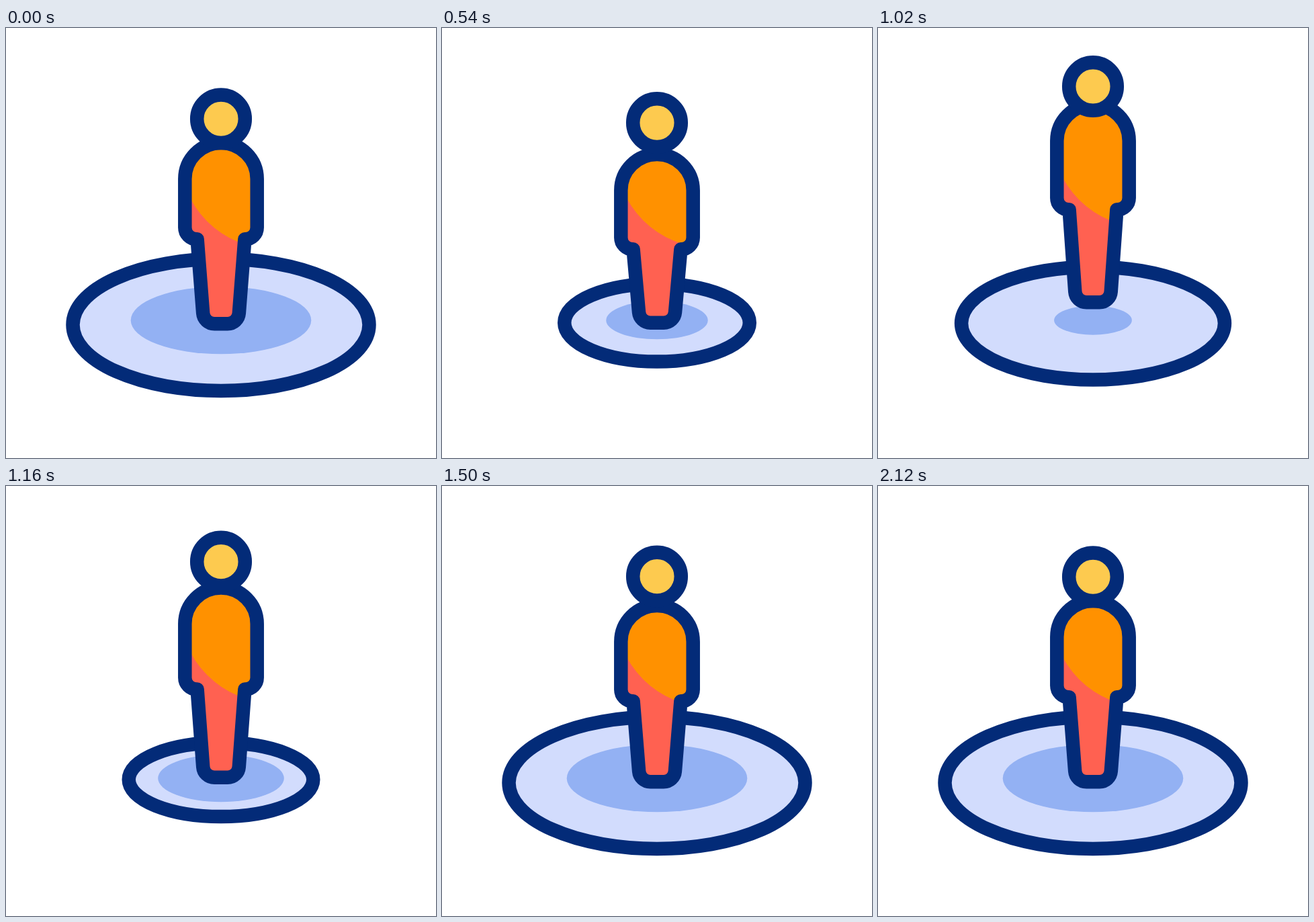
An HTML page with a canvas for the animation above (3 s loop, 640 px wide and 640 px high).

```html
<!DOCTYPE html>
<html lang="en">
<head>
<meta charset="utf-8">
<title>Jumping figure</title>
<style>
html, body { margin: 0; width: 100%; height: 100%; overflow: hidden; background: #fff; }
canvas { display: block; width: 100vw; height: 100vh; }
</style>
</head>
<body>
<canvas id="stage" width="640" height="640"></canvas>
<script>
const ctx = document.getElementById('stage').getContext('2d');
const LOOP = 3000;
const MID = 320;
const FLOOR = 440.2;

// Eased step from 0 at a to 1 at b
function ease(t, a, b) {
  const u = Math.min(1, Math.max(0, (t - a) / (b - a)));
  return u * u * (3 - 2 * u);
}

// Eased rise from a to b, then back to 0 from c to d
const hold = (t, a, b, c, d) => ease(t, a, b) - ease(t, c, d);
const swing = (t, a, peak, d) => hold(t, a, peak, peak, d);

function ellipse(y, rx, ry, fill) {
  ctx.beginPath();
  ctx.ellipse(MID, y, rx, ry, 0, 0, Math.PI * 2);
  ctx.fillStyle = fill;
  ctx.fill();
}

function bodyPath(top, hip) {
  const p = new Path2D();
  const r = 53.7, leg = 35.4, foot = 25.6;
  const shoulder = 224.8 + top, crotch = 314.3 + hip;
  p.arc(MID, shoulder, r, Math.PI, 0);
  p.arcTo(MID + r, crotch, MID + leg, crotch, 17.3);
  p.lineTo(MID + leg, crotch);
  p.arcTo(MID + foot, FLOOR, MID, FLOOR, 17);
  p.arcTo(MID - foot, FLOOR, MID - leg, crotch, 17);
  p.lineTo(MID - leg, crotch);
  p.arcTo(MID - r, crotch, MID - r, shoulder, 17.3);
  p.closePath();
  return p;
}

function drawDisc(t) {
  const spread = 25.5 * swing(t, 700, 880, 1180)
    - 108.7 * swing(t, 200, 700, 880)
    - 84.5 * swing(t, 880, 1180, 1418);
  const tilt = 2.7 * swing(t, 500, 1200, 1500);
  ellipse(441.8 + 0.038 * spread - 0.6 * tilt,
    220.5 + spread, 98.2 + 0.487 * spread - tilt, '#d2dcfd');
  ctx.stroke();

  const shade = 1 - 0.713 * swing(t, 100, 867, 1400);
  ellipse(435, 134.3 * shade, 50.3 * shade, '#93b1f3');
}

function drawBody(t) {
  const crouch = swing(t, 100, 610, 880);
  const stretch = swing(t, 610, 880, 1480);
  const land = swing(t, 880, 1480, 1760);
  const path = bodyPath(19.4 * crouch - 30 * stretch + 7 * land,
    17.5 * crouch - 15 * stretch + 6 * land);
  ctx.fillStyle = '#ff6151';
  ctx.fill(path);
  ctx.save();
  ctx.clip(path);
  ctx.beginPath();
  ctx.arc(399, 188, 141, 0, Math.PI * 2);
  ctx.fillStyle = '#ff9100';
  ctx.fill();
  ctx.restore();
  ctx.stroke(path);
}

function drawHead(t) {
  const nod = 22.5 * swing(t, 100, 390, 745)
    - 16.2 * hold(t, 390, 745, 1225, 1480)
    - 16.5 * swing(t, 1480, 1660, 2120);
  ellipse(135.2 + nod, 35.8, 35.8, '#fdca4f');
  ctx.stroke();
}

function draw(t) {
  ctx.fillStyle = '#fff';
  ctx.fillRect(0, 0, 640, 640);
  ctx.strokeStyle = '#032b78';
  ctx.lineWidth = 20.5;
  ctx.lineJoin = 'round';

  drawDisc(t);
  ctx.save();
  ctx.translate(0, -48 * swing(t, 500, 880, 1244));
  drawBody(t);
  drawHead(t);
  ctx.restore();
}

const start = performance.now();
function tick() {
  draw((performance.now() - start) % LOOP);
  requestAnimationFrame(tick);
}
tick();
</script>
</body>
</html>
```
